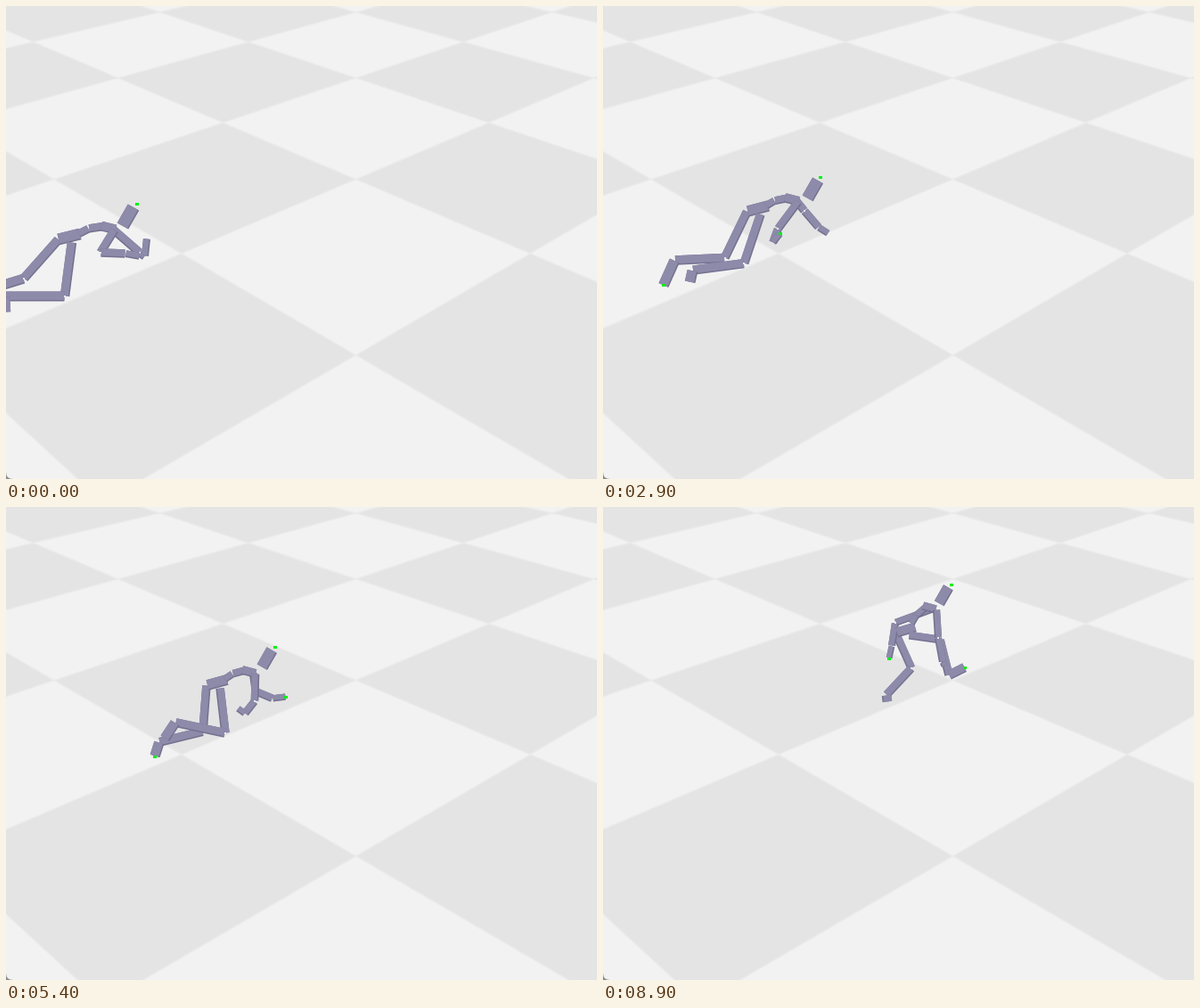
Animation, 663 px wide and 531 px high, one loop 9 s. Source, as an HTML page with a canvas:

```html
<!DOCTYPE html>
<html lang="en">
<head>
<meta charset="utf-8">
<title>Crawling figure</title>
<style>
html, body { margin: 0; width: 100%; height: 100%; overflow: hidden; background: #f2f2f2; }
canvas { display: block; }
</style>
</head>
<body>
<canvas id="stage" width="663" height="531"></canvas>
<script>
const ctx = document.getElementById('stage').getContext('2d');
const LOOP = 9000, STEP = 100;
const FACE = '#8d8aaa', SIDE = '#74718f', MARK = '#00f010';

// body: pelvis, chest, head marker. Limbs: three joints outward from the body.
const poses = [
  { t: 0, body: [71,259, 112,247, 146,222], marks: [],
    nearArm: [106,277, 134,278, 150,281], farArm: [150,277, 156,281, 158,261],
    nearLeg: [66,326, -2,326, -1,344], farLeg: [20,306, -2,313, -20,319] },
  { t: 700, body: [103,258, 142,242, 179,216], marks: ['farArm'],
    nearArm: [131,257, 163,266, 166,291], farArm: [157,253, 162,264, 176,262],
    nearLeg: [66,321, -2,326, -1,344], farLeg: [126,285, 78,294, 63,315] },
  { t: 2000, body: [138,233, 178,219, 213,197], marks: ['farArm'],
    nearArm: [180,263, 168,266, 165,254], farArm: [190,236, 213,249, 227,252],
    nearLeg: [126,296, 70,309, 70,318], farLeg: [122,290, 62,297, 66,331] },
  { t: 3800, body: [209,222, 240,211, 274,186], marks: ['nearArm', 'farLeg'],
    nearArm: [218,232, 230,249, 244,249], farArm: [260,222, 268,243, 275,252],
    nearLeg: [190,282, 131,284, 123,301], farLeg: [173,264, 142,257, 119,273] },
  { t: 5400, body: [237,197, 270,183, 301,157], marks: ['farArm', 'farLeg'],
    nearArm: [279,218, 268,232, 260,226], farArm: [280,207, 299,215, 314,213],
    nearLeg: [246,254, 190,242, 178,260], farLeg: [221,252, 172,264, 167,280] },
  { t: 7100, body: [271,190, 298,174, 329,148], marks: ['farLeg'],
    nearArm: [322,209, 331,219, 342,221], farArm: [285,200, 307,215, 322,211],
    nearLeg: [278,239, 241,249, 222,262], farLeg: [236,245, 195,245, 187,270] },
  { t: 8900, body: [340,138, 364,111, 390,87], marks: ['farArm', 'nearLeg'],
    nearArm: [376,147, 381,174, 383,179], farArm: [328,130, 324,156, 321,170],
    nearLeg: [378,149, 388,189, 406,180], farLeg: [346,181, 318,211, 319,219] }
];

const roots = {
  nearArm: b => [b[2] + 10, b[3] + 4], farArm: b => [b[2] + 7, b[3] + 3],
  nearLeg: b => [b[0] + 3, b[1] + 6], farLeg: b => [b[0] - 12, b[1] + 3]
};
const lerp = (a, b, u) => a + (b - a) * u;

function spline(a, b, c, d, u) {
  return b + u / 2 * (c - a + u * (2 * a - 5 * b + 4 * c - d + u * (3 * (b - c) + d - a)));
}

// Joints of a limb, each bone turning the short way between two poses
function limb(name, p, q, body, u) {
  const chain = pose => [...roots[name](pose.body), ...pose[name]];
  const a = chain(p), b = chain(q), joints = [roots[name](body)];
  for (let i = 2; i < 8; i += 2) {
    const ax = a[i] - a[i - 2], ay = a[i + 1] - a[i - 1];
    const bx = b[i] - b[i - 2], by = b[i + 1] - b[i - 1];
    const turn = Math.atan2(ax * by - ay * bx, ax * bx + ay * by);
    const angle = Math.atan2(ay, ax) + turn * u;
    const len = lerp(Math.hypot(ax, ay), Math.hypot(bx, by), u);
    const [x, y] = joints[joints.length - 1];
    joints.push([x + len * Math.cos(angle), y + len * Math.sin(angle)]);
  }
  // The far foot trails: it leaves the ground late in each stride
  if (name === 'farLeg') {
    const lag = u * u - u;
    [0, 0.5, 1, 1].forEach((share, n) => {
      joints[n][0] += (b[4] - a[4]) * lag * share;
      joints[n][1] += (b[5] - a[5]) * lag * share;
    });
  }
  return joints;
}

function box(a, b, width, gap = 0.5) {
  const len = Math.hypot(b[0] - a[0], b[1] - a[1]);
  if (len < 2 * gap + 1) return;
  ctx.save();
  ctx.translate(...a);
  ctx.rotate(Math.atan2(b[1] - a[1], b[0] - a[0]));
  ctx.fillStyle = SIDE;
  ctx.fillRect(gap, -width / 2, len - 2 * gap, width);
  ctx.fillStyle = FACE;
  const flip = b[0] < a[0] ? 1.5 : 0;
  ctx.fillRect(gap, -width / 2 + flip, len - 2 * gap, width - 1.5);
  ctx.restore();
}

function dot(p, color, w, h = w) {
  ctx.fillStyle = color;
  ctx.fillRect(Math.round(p[0] - w / 2), Math.round(p[1] - h / 2), w, h);
}

function floor() {
  const at = (d, s) => {
    const depth = d + 5.438;
    return [392.5 + 1259 * s / depth, 3991 / depth - 342];
  };
  ctx.fillStyle = '#f2f2f2';
  ctx.fillRect(0, 0, 663, 531);
  ctx.fillStyle = '#e4e4e4';
  ctx.strokeStyle = '#ebebeb';
  ctx.lineWidth = 1.5;
  for (let d = -3; d < 9; d += 2) {
    for (let s = -7; s < 8; s += 2) {
      ctx.beginPath();
      for (const corner of [[d, s], [d + 1, s + 1], [d + 2, s], [d + 1, s - 1]]) ctx.lineTo(...at(...corner));
      ctx.closePath();
      ctx.fill();
      ctx.stroke();
    }
  }
  ctx.fillStyle = '#8c8c8c';
  ctx.beginPath();
  ctx.moveTo(0, 523);
  ctx.quadraticCurveTo(0, 531, 8, 531);
  ctx.lineTo(0, 531);
  ctx.fill();
}

function figure(t) {
  const i = Math.max(0, poses.findLastIndex(p => p.t < t));
  const p = poses[i], q = poses[i + 1];
  const u = (t - p.t) / (q.t - p.t);
  const before = poses[i - 1] || p, after = poses[i + 2] || q;
  const body = p.body.map((v, n) => spline(before.body[n], v, q.body[n], after.body[n], u));
  const k = 1 - 0.15 * t / LOOP;
  const marks = (u < 0.5 ? p : q).marks;

  const drawLimb = name => {
    const joints = limb(name, p, q, body, u);
    const widths = name.endsWith('Leg') ? [10.5, 11, 12.5] : [9.5, 9.5, 8];
    widths.forEach((w, n) => box(joints[n], joints[n + 1], w * k));
    dot(joints[1], '#e8e8ee', 2);
    if (marks.includes(name)) dot(joints[3], MARK, 4, 3);
  };

  drawLimb('farLeg');
  drawLimb('farArm');

  const [px, py, cx, cy, hx, hy] = body;
  const dx = cx - px, dy = cy - py;
  const waist = [px + dx * 0.55 + dy * 0.06, py + dy * 0.55 - dx * 0.06];
  box([px - 12 * k, py + 3], [px + 12 * k, py - 3], 13 * k, 0);
  box([px + dx * 0.25, py + dy * 0.25], waist, 9 * k);
  box(waist, [cx, cy], 9.5 * k);
  box([cx - 5, cy], [cx + 11 * k, cy + 4], 11 * k, 0);

  drawLimb('nearLeg');
  drawLimb('nearArm');

  box([hx - 15 * k, hy + 25 * k], [hx - 3 * k, hy + 4 * k], 14.5 * k, 0);
  dot([hx + 0.5, hy], MARK, 4, 3);
}

function draw(now) {
  const t = Math.floor(now % LOOP / STEP) * STEP;
  floor();
  figure(t);
  requestAnimationFrame(draw);
}
requestAnimationFrame(draw);
</script>
</body>
</html>
```
